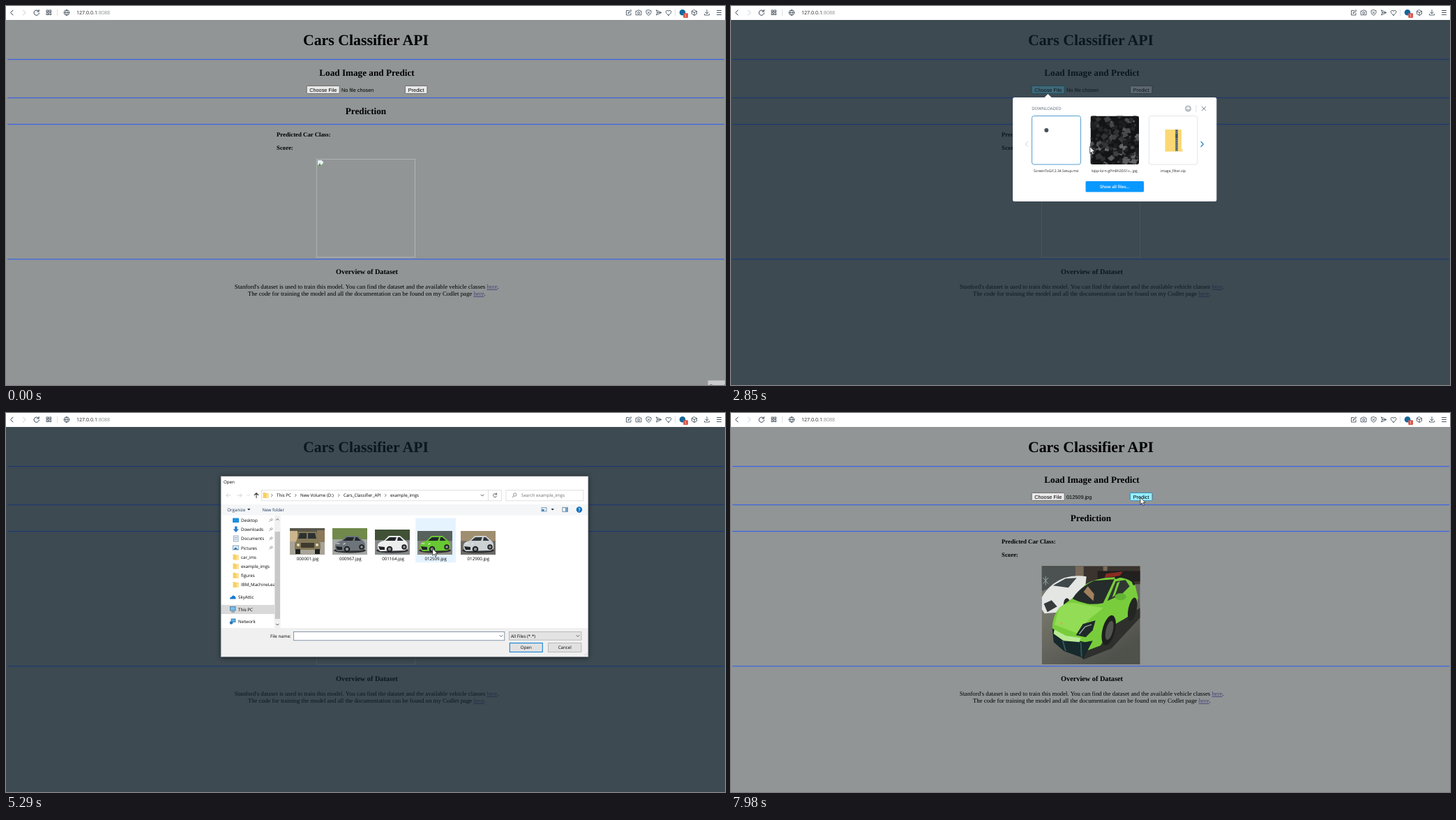
These frames come from a looping animation (1031x543 px, 8000 ms). An HTML page:

```html
<!DOCTYPE html>
<html lang="en">
<head>
<meta charset="utf-8">
<title>Cars Classifier API</title>
<style>
html, body { margin: 0; width: 100%; height: 100%; overflow: hidden; background: #919595; }
svg { display: block; width: 100vw; height: 100vh; }
text { text-rendering: geometricPrecision; white-space: pre; }
.serif { font-family: "Liberation Serif", Times, serif; }
.sans { font-family: "Liberation Sans", Arial, sans-serif; }
.ui { font-family: "Open Sans", "Noto Sans", sans-serif; }
.b { font-weight: bold; }
.mid { text-anchor: middle; }
.line { fill: none; stroke-linecap: round; stroke-linejoin: round; }
.link { fill: #47467c; text-decoration: underline; }
</style>
</head>
<body>
<svg id="stage" viewBox="0 0 1031 543"></svg>
<script>
const text = (x, y, size, str, cls = 'ui', fill = '#000') =>
  `<text x="${x}" y="${y}" font-size="${size}" class="${cls}" fill="${fill}">${str}</text>`;
const rect = (x, y, w, h, fill, more = '') =>
  `<rect x="${x}" y="${y}" width="${w}" height="${h}" fill="${fill}" ${more}/>`;
const line = (d, stroke = '#333', width = .9, more = '') =>
  `<path class="line" d="${d}" stroke="${stroke}" stroke-width="${width}" ${more}/>`;
const shape = (d, fill) => `<path d="${d}" fill="${fill}"/>`;
const dot = (x, y, r, fill, more = '') => `<circle cx="${x}" cy="${y}" r="${r}" fill="${fill}" ${more}/>`;
const box = (x, y, w, h, fill, stroke, more = '') =>
  rect(x, y, w, h, fill, `stroke="${stroke}" stroke-width=".8" ${more}`);
const group = (id, body, more = '') => `<g id="${id}" ${more}>${body}</g>`;

function toolbar() {
  const ink = '#34424e';
  return rect(0, 0, 1031, 20, '#fff') +
    line('M10 6 6.5 9.5 10 13', ink, 1) + line('M24.500 6 28 9.500 24.500 13', '#c4c9cd', 1) +
    line('M46.600 7.200A3.700 3.700 0 1 0 47.500 10M47.200 5.500V8H44.700', ink, 1) +
    [[58, 6], [62, 6], [58, 10], [62, 10]].map(([x, y]) => box(x, y, 2.6, 2.6, 'none', ink)).join('') +
    line('M73.5 5V14M959.5 5V14', '#d5d9dc', .8) +
    dot(87, 9.5, 3.8, 'none', `stroke="${ink}" stroke-width=".8"`) +
    line('M83.200 9.500H90.800M87 5.700Q83.500 9.500 87 13.300M87 5.700Q90.500 9.500 87 13.300', ink, .7) +
    text(101, 12.2, 7.1, '127.0.0.1<tspan fill="#8b8f92">:8088</tspan>', 'ui', '#222') +
    line('M893 6.500H889.500V13H896V10M892 10.500 892.500 9 896 5.500 897 6.500 893.500 10Z', ink, .8) +
    line('M903.500 7.200H905.300L906 6H908.500L909.200 7.200H911V12.800H903.500Z', ink, .8) +
    dot(907.2, 9.9, 1.5, 'none', `stroke="${ink}" stroke-width=".8"`) +
    line('M921.500 5.700 925 6.700V9.500Q924.500 12 921.500 13.400 918.500 12 918 9.500V6.700ZM920.300 8.300 922.700 10.700M922.700 8.300 920.300 10.700', ink, .8) +
    line('M932.500 6 940 9.500 932.500 13 934 9.500ZM934 9.500H938', ink, .8) +
    line('M950 13.200C943.500 9 946.500 4.500 950 7.300 953.500 4.500 956.500 9 950 13.200Z', ink, .9) +
    dot(970, 9.3, 4.3, '#14689b') + rect(971.2, 10.2, 6.8, 6.8, '#d8574a', 'rx="1"') +
    text(974.6, 15.8, 5.6, '1', 'ui mid', '#fff') +
    line('M987 5.700 990.500 7.500V11.500L987 13.400 983.500 11.500V7.500ZM983.500 7.500 987 9.400 990.500 7.500M987 9.400V13.400', ink, .8) +
    line('M1005 5.500V10.800M1002.800 8.800 1005 11 1007.200 8.800M1001.500 11.500V13H1008.500V11.500', ink, .8) +
    line('M1019.500 6.500H1025.500M1019.500 9.500H1025.500M1019.500 12.500H1025.500', ink, .9);
}

const button = (id, x, w, label) =>
  box(x, 114.4, w, 11, '#e9e9e9', '#5a5a5a', 'rx="1"') +
  box(x, 114.4, w, 11, '#98eeff', '#2b8fbd', `rx="1" id="${id}"`) +
  text(x + w / 2, 122.5, 7.33, label, 'sans mid');

function page() {
  return rect(0, 20, 1031, 523, '#919595') +
    text(516, 55.5, 21.8, 'Cars Classifier API', 'serif b mid') +
    [76.5, 131.5, 169.5, 362.7].map(y => rect(2, y - .6, 1028, 1.3, '#3f66e0')).join('') +
    text(517.5, 100.3, 13.2, 'Load Image and Predict', 'serif b mid') +
    button('chooseLit', 431.2, 47, 'Choose File') +
    `<text id="fileName" x="481" y="122.500" font-size="7.330" class="sans"></text>` +
    button('predictLit', 572.4, 31.5, 'Predict') +
    text(516, 154.8, 13.2, 'Prediction', 'serif b mid') +
    text(388, 186.8, 8.78, 'Predicted Car Class:', 'serif b') +
    text(388, 205.6, 8.78, 'Score:', 'serif b') +
    group('broken', box(445.5, 219.5, 141, 140.5, 'none', '#b9bcbc') +
      shape('M447 221H452.500L455 223.500V229H447Z', '#e8eef2') +
      shape('M447 229 450 225 452 229Z', '#4f9a4a') + shape('M451 229 455 225V229Z', '#919595')) +
    group('photo', photo()) +
    text(517.5, 383.8, 10.27, 'Overview of Dataset', 'serif b mid') +
    text(517.3, 405, 8.8, "Stanford's dataset is used to train this model. You can find the dataset and the available vehicle classes <tspan class='link'>here</tspan>.", 'serif mid') +
    text(517.3, 415, 8.8, "The code for training the model and all the documentation can be found on my Codlet page <tspan class='link'>here</tspan>.", 'serif mid');
}

function photo() {
  return `<svg x="445.500" y="219.300" width="141.300" height="141" viewBox="0 0 141 141">` +
    rect(0, 0, 141, 141, 'url(#floor)') + shape('M0 0H141V26H0Z', '#3a332e') +
    shape('M0 0H48V16L0 36Z', '#4b5251') + shape('M48 0H60V18H48ZM88 0H94V12H88Z', '#77695a') +
    line('M2 17 9 25M2 25 9 17M5.500 15V27', '#9aa5a7', 1) +
    shape('M80 7H141V22H80Z', '#231f1f') + shape('M92 11 116 8 112 14 90 17Z', '#8c2c22') +
    shape('M0 45Q10 26 32 17Q48 12 64 15L62 34 40 52 28 66 4 68 0 62Z', '#e4e6e4') +
    shape('M16 28 34 18 50 17 38 31Z', '#41484a') + shape('M3 54 14 49 22 58 8 66Z', '#363a3b') +
    `<ellipse cx="36" cy="56" rx="5" ry="10" fill="#252729"/>` +
    shape('M16 92 60 134 100 118 141 74V60L90 90Z', '#2f302d') +
    shape('M44 46 62 27Q76 17 104 16Q126 16 134 28L138 45 134 66 118 76 104 84 84 114 62 122 22 104 15 90Q15 72 25 60Z', '#79cd3c') +
    shape('M25 60Q38 48 58 55L88 60 68 76 50 96 18 84Z', '#93dc55') +
    shape('M44 47Q53 31 75 21L104 19 88 53Q66 58 44 47Z', '#252c2b') +
    shape('M60 37 66 29 75 40 74 50Z', '#a3805d') +
    shape('M94 50 106 22 120 20 126 29 114 41Z', '#2e3631') + shape('M108 24 112 22 105 42 101 45Z', '#79cd3c') +
    `<ellipse cx="113" cy="44" rx="8" ry="5" fill="#64b332"/>` +
    line('M106 17Q126 10 139 18M128 16 132 26', '#20221f', 3) +
    `<ellipse cx="96" cy="92" rx="9" ry="22" transform="rotate(14 96 92)" fill="#1d201e"/>` +
    `<ellipse cx="97" cy="92" rx="5" ry="14" transform="rotate(14 97 92)" fill="#50534e"/>` +
    `<ellipse cx="130" cy="62" rx="6" ry="17" transform="rotate(12 130 62)" fill="#232623"/>` +
    shape('M49 99 59 83 77 78 73 92 63 102Z', '#20292a') + line('M54 97 62 87 71 84', '#a4bbb4', 1.2) +
    shape('M15 89 34 103 62 109 73 107 60 132 32 122 17 109Z', '#17292b') +
    shape('M18 91 35 100 56 103 54 109 31 107 17 97Z', '#b9e994') +
    line('M30 107 34 121M56 110 57 129', '#33565c', 2) + dot(28, 82, 1.6, '#d0b14a') + `</svg>`;
}

function stones() {
  let seed = 7, out = rect(515.5, 157.5, 69.5, 69.5, '#131415');
  const rnd = () => (seed = seed * 16807 % 2147483647) / 2147483647;
  for (let i = 0; i < 150; i++) {
    const x = 515 + rnd() * 70, y = 157 + rnd() * 70, a = rnd() * 6.3, r = 2 + rnd() * 4, v = 28 + rnd() ** 2 * 75 | 0;
    const pts = [0, 1.3, 2.7, 4.3].map(k => `${x + Math.cos(a + k) * r},${y + Math.sin(a + k) * r * .9}`);
    out += `<polygon points="${pts.join(' ')}" fill="rgb(${v},${v + 1},${v + 2})"/>`;
  }
  return `<g clip-path="url(#stoneClip)">${out}</g>`;
}

function popup() {
  const grey = '#5b6a76';
  return shape('M449 131.500 454.500 126 460 131.500Z', '#fff') + rect(404, 131, 292.3, 149, '#fff', 'rx="2.5"') +
    text(431.2, 149.3, 6, 'DOWNLOADED', 'ui', grey) +
    dot(655.5, 147, 3.8, 'none', `stroke="${grey}" stroke-width=".8"`) +
    line('M653.500 148.200Q655.500 150.500 657.500 148.200M654.200 145.700V146M656.800 145.700V146', grey, .8) +
    line('M667 142.500V151.500', '#d5dadd', .8) + line('M675.300 144.300 680.700 149.700M680.700 144.300 675.300 149.700', grey, .8) +
    line('M425.500 194.500 422.300 198 425.500 201.500', '#ccd3d8', 1) + line('M674 194.500 677.300 198 674 201.500', '#2c86c7', 1.2) +
    box(431.5, 157.5, 70, 69.5, '#fff', '#2c86c7', 'rx="3"') + dot(452.3, 178, 3, '#46535c') + stones() +
    box(599.3, 157.5, 69.5, 69.5, '#fff', '#d8dde1', 'rx="3"') +
    shape('M622.500 177H646V205H647.500V208.500H622.500Z', '#fbd873') + rect(637, 177, 4, 31, '#788b99') +
    line('M639 178V207', '#35434c', 2, 'stroke-dasharray="1 1.6" style="stroke-linecap:butt"') + rect(637.6, 183, 2.8, 6, '#43525d') +
    text(466.3, 237.8, 5.1, 'ScreenToGif.2.34.Setup.msi', 'ui mid', '#222') +
    text(550, 237.8, 5.1, 'kipp-lorn-gPm8h3DS1s...jpg', 'ui mid', '#222') +
    text(634, 237.8, 5.1, 'image_filter.zip', 'ui mid', '#222') +
    rect(508.5, 251, 83.5, 15.6, '#0a98ff', 'rx="1.5" id="showAll"') +
    text(550.2, 261, 6, 'Show all files...', 'ui mid', '#fff" font-weight="600');
}

// Small picture of a car; (x, y) is the top left corner, 50 wide
function car(x, y, h, back, ground, body, glass) {
  return `<svg x="${x}" y="${y}" width="50" height="${h}" viewBox="0 0 50 ${h}">` +
    rect(0, 0, 50, h, ground) + rect(0, 0, 50, h * .42, back) +
    `<ellipse cx="25" cy="${h - 6}" rx="23" ry="3.500" fill="#2f3133"/><g transform="translate(0 ${h - 36})">` +
    shape('M4 22Q6 17 13 16L20 9H36L44 16Q48 19 47 27L43 30 8 31Q3 29 4 22Z', body) +
    shape('M15 16 21 11H31L29 16ZM33 11 36 11 41 16 32 16Z', glass) +
    shape('M5 24 14 25 14 29 7 29Z', '#202426') +
    dot(21, 28, 4.3, '#1d1f20') + dot(42, 25, 3.7, '#1d1f20') + dot(21, 28, 2.3, '#8b9092') + dot(42, 25, 1.9, '#8b9092') +
    line('M6 20 10 20M16 21 18 20', '#eee', 1.2) + `</g></svg>`;
}

const jeep = () => `<svg x="407" y="165" width="50" height="38">` +
  rect(0, 0, 50, 38, '#a9a498') + rect(0, 0, 50, 14, '#59564b') + rect(0, 4, 11, 15, '#cbb58d') + rect(39, 3, 11, 17, '#8c7a5b') +
  shape('M12 5H38L41 17 44 22V31H7V22L10 17Z', '#837857') + shape('M14 7H24V15H12ZM26 7H36L38 15H26Z', '#2c3030') +
  shape('M8 30H15V37H8ZM36 30H43V37H36Z', '#1f2020') + rect(16, 21, 19, 7, '#3d3a2e') +
  dot(12, 24, 2, '#e3dcc1') + dot(39, 24, 2, '#e3dcc1') + '</svg>';

const folder = (x, y) => shape(`M${x} ${y}h3l1 1h4v7h-8z`, '#f7cf63') + shape(`M${x + 5} ${y + 2}h3v6h-3z`, '#fbe39c');

function navPane() {
  const items = ['Desktop', 'Downloads', 'Documents', 'Pictures', 'car_ims', 'example_imgs', 'figures', 'IBM_MachineLea'];
  const icons = [
    rect(325, 150.500, 9, 6.500, '#1f8fe0', 'rx=".6"'), shape('M328 162.500H331.500V166.500H334L329.700 171 325.500 166.500H328Z', '#2a7fd4'),
    box(326.500, 176, 6.500, 8, '#f4f8fb', '#8798a6') + line('M328 178.500H331.500M328 181H331.500', '#3d86c6', .7),
    box(325.200, 190, 8.500, 6, '#d9eefb', '#7996ab') + shape('M326 195.500 329 192.500 333 195.500Z', '#2b6ca8')];
  const list = items.map((name, i) => {
    const y = 153.6 + i * 13.2;
    return (icons[i] || folder(325.5, y - 4)) + text(337, y + 2.3, 6.2, name) +
      (i < 4 ? line(`M377.500 ${y + 2} 379.500 ${y}M378.500 ${y - 1.500} 381 ${y + 1}M379.500 ${y - 1} 381 ${y - 2.500} 382.500 ${y - 1} 381 ${y + .500}`, '#777', .7) : '');
  }).join('');
  return `<g clip-path="url(#navClip)">` + rect(308, 275, 77, 13, '#d9d9d9') + list +
    shape('M321 266.500Q321 263.500 323.500 263.500 325 260 328 262.500 330 263.500 329.500 266.500Z', '#1479d2') + text(333, 266, 6.2, 'SkyAttic') +
    box(321.5, 277.5, 7.5, 5.5, '#6fc4f2', '#4a6e88') + line('M323.500 285H327.500', '#4a6e88', 1) + text(333, 283.5, 6.2, 'This PC') +
    box(323, 295, 6, 4.5, '#57b3ec', '#3c6f95') + dot(323, 300.5, 2.3, '#2d75b8') + text(333, 301.1, 6.2, 'Network') + '</g>' +
    rect(385, 147, 8.5, 161, '#f0f0f0') + rect(385.5, 170, 7.5, 125, '#c8c8c8') +
    line('M387.500 153.300 389.200 151.500 391 153.300M387.500 302.200 389.200 304 391 302.200', '#444');
}

function content() {
  const blue = '#1e395b', pale = '#cfcfcf', down = (x, y) => line(`M${x - 2} ${y - 1}l2 2 2 -2`, '#444', .8);
  const crumbs = [[388, 'This PC'], [422, 'New Volume (D:)'], [484, 'Cars_Classifier_API'], [551, 'example_imgs']];
  const names = ['000001', '000967', '001164', '012509', '012900'];
  return text(312, 100.8, 6.2, 'Open') +
    line('M322 118H316M318.300 115.500 315.800 118 318.300 120.500M332 118H338M335.700 115.500 338.200 118 335.700 120.500M346 117.500 347.500 119 349 117.500', pale) +
    line('M359 121.500V115M356.200 117.500 359 114.700 361.800 117.500', '#444', 1.1) +
    box(366.4, 110.4, 344, 15.4, '#fff', '#d9d9d9') + folder(368.5, 114) + line('M691.500 110.500V125.500', '#d9d9d9', .8) +
    crumbs.map(([x, s]) => line(`M${x - 7.5} 116.200l1.700 1.700-1.700 1.700`, '#555', .8) + text(x, 120.3, 6.2, s)).join('') +
    down(683, 118) + line('M703.300 116.500A2.600 2.600 0 1 0 703.600 119M703.500 114.800V116.800H701.500', '#444', .8) +
    box(717, 110.4, 111, 15.4, '#fff', '#d9d9d9') + dot(729.8, 117, 2.2, 'none', 'stroke="#777" stroke-width=".8"') +
    line('M728.200 118.700 726.200 120.800', '#777') + text(739, 120.3, 6.2, 'Search example_imgs', 'ui', '#6d6d6d') +
    rect(308.4, 131, 526, 15.5, '#f5f6f7') + text(317.3, 140.6, 6.2, 'Organize', 'ui', blue) + text(367.5, 140.6, 6.2, 'New folder', 'ui', blue) +
    shape('M346 137H350.500L348.200 139.500ZM781.500 137H786L783.700 139.500Z', blue) +
    box(768, 135.5, 7, 5.5, '#dceefa', '#7790a5') + rect(768.5, 138, 3, 2.5, '#2c70b1') +
    box(798, 135.3, 7.5, 6, '#fff', '#55708a') + rect(802, 135.5, 3.5, 5.6, '#6ba2cf') +
    dot(822, 138.5, 4.2, '#0d6fc0') + text(822, 141, 6.5, '?', 'ui b mid', '#fff') +
    navPane() +
    group('files', rect(587.3, 150.5, 57.6, 63.7, '#d9d9d9', 'id="pick"') + jeep() +
      car(468, 165, 38, '#71894b', '#a5a8a6', '#6d747a', '#23282d') + car(529, 167, 36, '#405136', '#85898a', '#eceeee', '#25292c') +
      car(590, 169, 34, '#59615c', '#8b8880', '#68c833', '#20282a') + car(652, 169, 34, '#a08e70', '#6d6b68', '#ccd1d3', '#31373a') +
      names.map((n, i) => text(432.6 + i * 61.2, 211, 6.2, n + '.jpg', 'ui mid')).join('')) +
    rect(308.4, 308, 526, 41.5, '#f0f0f0') + text(379, 321.7, 6.2, 'File name:') +
    box(412.4, 313.4, 302.4, 12.4, '#fff', '#6d7f92') + down(710, 319.5) +
    rect(413.8, 315.3, 32.6, 8.5, '#0a74d1', 'id="nameMark"') + text(414.3, 321.7, 6.2, '<tspan id="nameField">012509.jpg</tspan>') +
    box(721.5, 313.4, 103.5, 11.8, '#e3e3e3', '#adadad') + text(724, 321.6, 6.2, 'All Files (*.*)') + down(820, 319.5) +
    rect(722.3, 329.6, 47, 12.8, '#e1e1e1', 'id="openBtn" stroke="#0078d7" stroke-width="1"') + text(745.8, 338.2, 6.2, 'Open', 'ui mid') +
    box(777.6, 329.6, 47.4, 12.8, '#e1e1e1', '#adadad') + text(801.2, 338.2, 6.2, 'Cancel', 'ui mid') +
    line('M833 344V344.100M833 346.500V346.600M830.500 346.500V346.600', '#aaa', 1);
}

function dialog() {
  const blank = dot(316.3, 97.8, 4.4, '#b8383d') + text(323.8, 100, 6.2, 'Open') +
    line('M824 95.500 829 100.500M829 95.500 824 100.500', '#222') +
    rect(308, 308, 527, 42, '#f0f0f0') + rect(379, 315, 30, 8, '#fff') + rect(412, 313, 303, 12.5, '#fff') +
    rect(721, 313, 104, 12, '#fff') + rect(721, 329, 49, 14, '#fff') + rect(776, 329, 49, 14, '#fff') + rect(825, 340, 10, 10, '#fff');
  return rect(308, 90.3, 527, 259.5, '#fff', 'style="filter:drop-shadow(0 1px 3px #0009)"') +
    group('blank', blank) + group('content', content()) + box(308, 90.5, 527, 259, 'none', '#5d666c');
}

const stage = document.getElementById('stage');
stage.innerHTML = `<defs>
  <linearGradient id="floor" x2=".6" y2="1"><stop offset=".3" stop-color="#79786d"/><stop offset="1" stop-color="#4f514b"/></linearGradient>
  <clipPath id="stoneClip"><rect x="515.500" y="157.500" width="69.500" height="69.500" rx="3"/></clipPath>
  <clipPath id="navClip"><rect x="308.400" y="147" width="76.500" height="160"/></clipPath></defs>` +
  page() +
  group('note', rect(1006.5, 536.5, 25, 7, '#c9cbcc') + text(1009, 547, 7, 'Recorder', 'ui', '#444')) +
  rect(0, 20, 1031, 523, 'rgb(18,35,47)', 'id="dim"') + toolbar() +
  group('popup', popup()) + group('dialog', dialog()) +
  group('arrow', '<path d="M0 0V10L2.300 7.900 3.900 11.500 5.500 10.800 4 7.300H7Z" fill="#fff" stroke="#111" stroke-width=".7"/>') +
  group('ring', dot(0, 0, 4.5, 'none', 'stroke="#3d93d6" stroke-width="2.200"') + line('M0 -4.500A4.500 4.500 0 0 1 4.500 0', '#b9e0f6', 1.5));

const el = {};
stage.querySelectorAll('[id]').forEach(n => el[n.id] = n);

// Pointer path: time, x, y
const path = [
  [0, 1014, 552], [70, 1008, 534], [250, 925, 435], [400, 850, 360], [620, 583, 285], [810, 546, 254.5], [860, 546, 254.5],
  [1200, 505, 195], [1450, 466, 135], [1620, 460.3, 118.5], [1690, 460.7, 119.5], [2550, 460.7, 119.5],
  [2850, 514.5, 201], [3060, 549, 257], [3620, 549, 257], [3850, 545, 259.5], [4700, 545, 259.5],
  [4880, 568, 258], [5350, 618, 185], [5600, 618, 185], [6000, 700, 295], [6250, 732, 334.5], [6700, 732, 334.5],
  [6860, 722, 268], [6990, 690, 203], [7120, 633, 148], [7400, 600, 130], [7650, 587, 121], [8000, 587, 121]];

const ramp = (t, a, b) => Math.min(1, Math.max(0, (t - a) / (b - a)));
const pulse = (t, a, b, c, d) => ramp(t, a, b) - ramp(t, c, d);
const fade = (n, v) => n.setAttribute('opacity', v);
const show = (n, on) => n.setAttribute('display', on ? 'inline' : 'none');
const fill = (n, c) => n.setAttribute('fill', c);

function pointer(t) {
  const i = path.findIndex(p => p[0] > t), [a, b] = [path[i - 1], path[i]], k = ramp(t, a[0], b[0]);
  return [a[1] + (b[1] - a[1]) * k, a[2] + (b[2] - a[2]) * k];
}

function draw(t) {
  const [x, y] = pointer(t), busy = t >= 3620 && t < 4500, loaded = t >= 6870;
  show(el.note, t < 70);
  fade(el.chooseLit, pulse(t, 1930, 2160, 6800, 7000));
  fade(el.predictLit, ramp(t, 7880, 7980));
  el.fileName.textContent = loaded ? '012509.jpg' : 'No file chosen';
  show(el.broken, !loaded);
  show(el.photo, loaded);
  fade(el.dim, .65 * pulse(t, 2270, 2480, 6800, 7000));
  fade(el.popup, pulse(t, 2350, 2540, 3740, 3900));
  fill(el.showAll, t >= 3410 && t < 3480 ? '#0080dd' : t >= 3140 ? '#2ba6ff' : '#0a98ff');

  const grow = 1 - (1 - ramp(t, 4455, 4620)) ** 3, s = .945 + .055 * grow;
  fade(el.dialog, grow - ramp(t, 6730, 6860));
  el.dialog.setAttribute('transform', `translate(571.5 220) scale(${s}) translate(-571.5 -220)`);
  show(el.blank, t < 4690);
  show(el.content, t >= 4690);
  show(el.files, t >= 4830);

  const picked = t >= 5490, pressed = t >= 6530;
  show(el.pick, t >= 5280);
  fill(el.pick, pressed ? '#d9d9d9' : picked ? '#cce8ff' : '#e5f3ff');
  show(el.nameField, picked);
  show(el.nameMark, pressed);
  fill(el.nameField, pressed ? '#fff' : '#000');
  fill(el.openBtn, pressed ? '#cce4f7' : t >= 6320 ? '#e5f1fb' : '#e1e1e1');

  show(el.arrow, !busy);
  show(el.ring, busy);
  el.arrow.setAttribute('transform', `translate(${x} ${y})`);
  el.ring.setAttribute('transform', `translate(${x - .3 + 3.8 * (1 - ramp(t, 3620, 3850))} 259.5) rotate(${(t - 3950) * .36})`);
}

const start = performance.now();
(function loop() {
  draw((performance.now() - start) % 8000);
  requestAnimationFrame(loop);
})();
</script>
</body>
</html>
```
